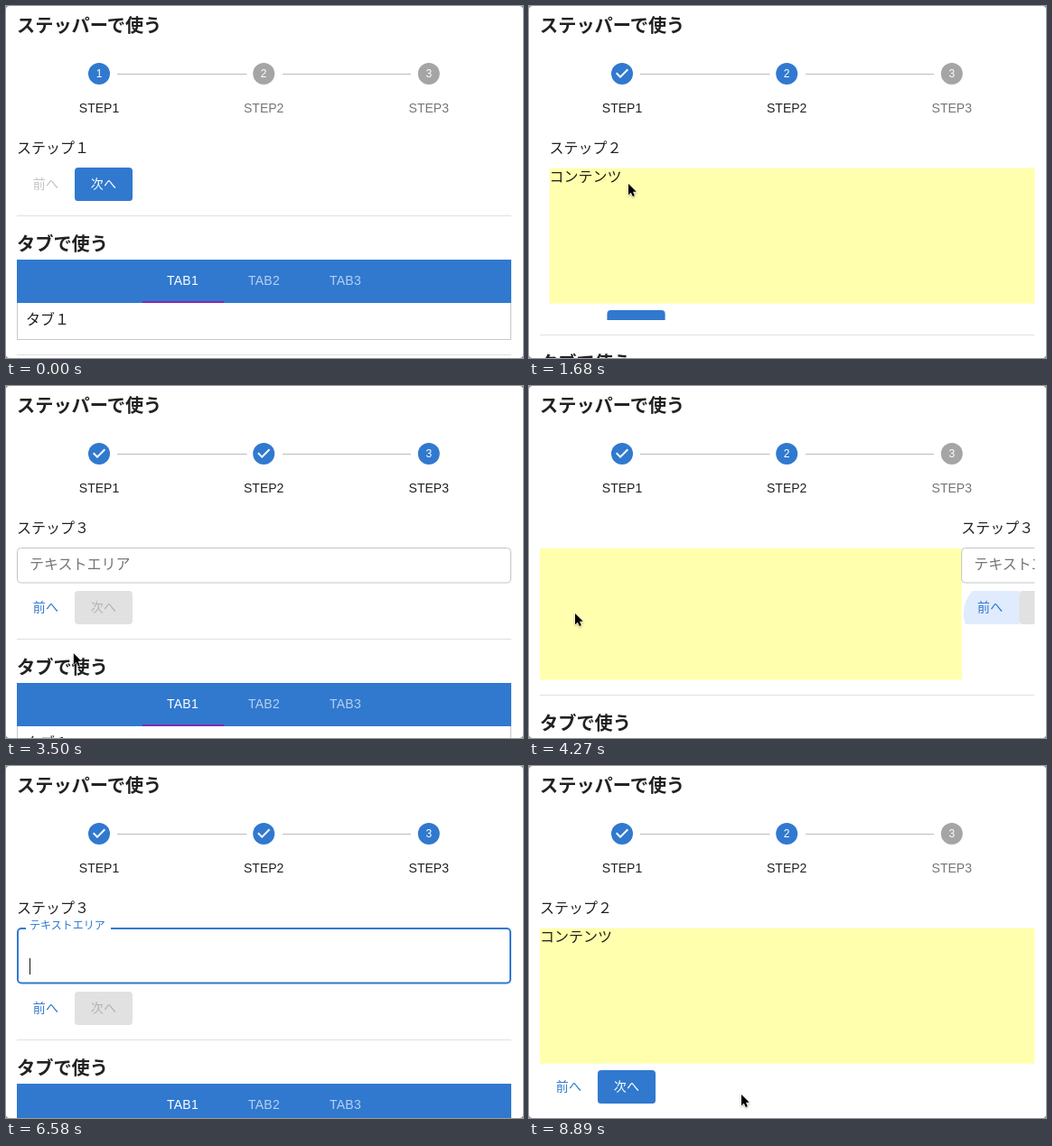
An HTML page that plays this animation: 572 px wide and 390 px high, repeating every 8.96 s.

```html
<!DOCTYPE html>
<html lang="ja">
<head>
<meta charset="utf-8">
<title>Stepper and tabs</title>
<style>
html, body { margin: 0; width: 100%; height: 100%; overflow: hidden; background: #fff; }
#stage { display: block; width: 572px; height: 390px; font-family: "Noto Sans CJK JP", "Noto Sans CJK", sans-serif; }
.latin { font-family: "Liberation Sans", Arial, sans-serif; }
</style>
</head>
<body>
<svg id="stage" viewBox="0 0 572 390"></svg>
<script>
const LOOP = 8960, PAGE = 547;
const BLUE = [48, 121, 207], DARK_BLUE = [38, 100, 184], GRAY = [165, 165, 165];
const INK = [33, 33, 33], MUTED = [117, 117, 117];
const stage = document.getElementById('stage');

// Page changes: swipe start, height change start, and the moment both settle
const moves = [
  { to: 1, swipe: 1402, grow: 1515, end: 1750 },
  { to: 2, swipe: 2752.5, grow: 2770, end: 3080 },
  { to: 1, swipe: 4097, grow: 4186, end: 4410 },
  { to: 2, swipe: 5171, grow: 5247, end: 5521 },
  { to: 1, swipe: 7910, grow: 7995, end: 8260 }
];
const presses = [
  { page: 0, next: true, x: 34, y: 18, enter: 700, down: 1260, up: 1400 },
  { page: 1, next: true, x: 23, y: 5, enter: 2380, down: 2600, up: 2750 },
  { page: 2, next: false, x: 39, y: 25, enter: 3620, down: 3990, up: 4095 },
  { page: 1, next: true, x: 24, y: 13, enter: 4820, down: 5030, up: 5169 },
  { page: 2, next: false, x: 37, y: 16, enter: 7540, down: 7770, up: 7910 }
];
const pointerPath = [
  [70, 566, 380], [840, 118, 205], [980, 118, 205], [1200, 110, 197],
  [2030, 110, 197], [2500, 99, 341], [3220, 99, 341], [3780, 51, 252],
  [4550, 51, 252], [4900, 100, 350], [5180, 104, 350], [5320, 127, 276],
  [5700, 126, 204], [7140, 126, 204], [7630, 49, 289], [8750, 49, 289], [8890, 235, 364]
];
const FOCUS = 6040, BLUR = 7780;

const clamp = v => Math.max(0, Math.min(1, v));
const lerp = (a, b, p) => a + (b - a) * p;
const mix = (a, b, p) => `rgb(${a.map((v, i) => Math.round(lerp(v, b[i], p)))})`;
const blueFill = mix(BLUE, BLUE, 0);

function bezier(x1, y1, x2, y2) {
  const at = (a, b, s) => 3 * (1 - s) ** 2 * s * a + 3 * (1 - s) * s * s * b + s ** 3;
  return p => {
    if (p <= 0) return 0;
    if (p >= 1) return 1;
    let low = 0, high = 1;
    for (let i = 0; i < 24; i++) {
      const mid = (low + high) / 2;
      if (at(x1, x2, mid) < p) low = mid; else high = mid;
    }
    return at(y1, y2, low);
  };
}
const swipeEase = bezier(.15, .3, .25, 1);
const standardEase = bezier(.4, 0, .2, 1);
const outEase = bezier(0, 0, .2, 1);

const rect = (x, y, w, h, fill, extra = '') =>
  `<rect x="${x}" y="${y}" width="${w}" height="${h}" fill="${fill}" ${extra}/>`;
const text = (x, y, size, fill, content, extra = '') =>
  `<text x="${x}" y="${y}" font-size="${size}" fill="${fill}" ${extra}>${content}</text>`;
const centered = (x, y, size, fill, content, extra = '') =>
  text(x, y, size, fill, content, `class="latin" text-anchor="middle" ${extra}`);
const heading = (y, content) => text(12, y, 20.2, '#212121', content, 'font-weight="700"');
const group = (x, y, content, extra = '') =>
  `<g transform="translate(${x} ${y})" ${extra}>${content}</g>`;

function layout(t) {
  const lines = t >= 6650 ? 2 : t >= 6580 ? 1 : 0;
  const bottoms = [216, 374, 264 + 23 * lines];
  let from = 0, step = 0, move = null;
  for (const m of moves) {
    if (t < m.swipe - 30) break;
    from = step;
    step = m.to;
    move = m;
  }
  if (!move) return { lines, from, step, page: 0, bottom: bottoms[0], fade: 1 };
  const progress = start => t >= move.end ? 1 : swipeEase((t - start) / 350);
  return {
    lines, from, step,
    page: lerp(from, step, progress(move.swipe)),
    bottom: lerp(bottoms[from], bottoms[step], progress(move.grow)),
    fade: standardEase((t - move.swipe + 30) / 200)
  };
}

function stepper({ from, step, fade }) {
  let out = rect(123, 75, 143.5, 1, '#bdbdbd') + rect(306, 75, 142, 1, '#bdbdbd');
  [103, 285.2, 467.8].forEach((x, i) => {
    const active = lerp(i <= from ? 1 : 0, i <= step ? 1 : 0, fade);
    const mark = i < step
      ? '<path d="M-2 5L-7 0l1.4-1.4L-2 2.2l7.6-7.6L7-4z" fill="#fff"/>'
      : centered(0, 4.2, 12, '#fff', i + 1);
    out += group(x, 75, `<circle r="12" fill="${mix(GRAY, BLUE, active)}"/>` + mark);
    out += centered(x, 118, 14, mix(MUTED, INK, active), 'STEP' + (i + 1));
  });
  return out;
}

function button(t, page, next, y, enabled) {
  let hover = 0, ripple = '';
  for (const p of presses) {
    if (p.page !== page || p.next !== next || t < p.enter) continue;
    hover = clamp((t - p.enter) / 250) * (1 - clamp((t - p.up) / 250));
    if (t >= p.down && t < p.up + 550) {
      const radius = 46 * standardEase((t - p.down) / 550);
      const opacity = .26 * (1 - standardEase((t - p.up) / 550));
      ripple = `<circle cx="${p.x}" cy="${p.y}" r="${radius}" fill="${next ? '#fff' : '#3d83f0'}" opacity="${opacity}"/>`;
    }
  }
  const x = next ? 76 : 12, blue = mix(BLUE, DARK_BLUE, hover);
  let face = '', ink = enabled ? blueFill : '#c3c3c3';
  if (next) {
    ink = enabled ? '#fff' : '#b3b3b3';
    if (enabled) face = rect(0, .8, 64, 37, '#000', 'rx="4" opacity=".2"');
    face += rect(0, 0, 64, 37, enabled ? blue : '#e1e1e1', 'rx="4"');
  } else if (hover) {
    face = rect(0, 0, 64, 37, blue, `rx="4" opacity="${.03 * hover}"`);
  }
  return group(x, y, face + `<svg width="64" height="37">${ripple}</svg>` +
    text(17.8, 23, 14, ink, next ? '次へ' : '前へ', 'letter-spacing=".2"'));
}

const buttons = (t, page, y) =>
  button(t, page, false, y, page > 0) + button(t, page, true, y, page < 2);

function textField(t, lines) {
  const focused = t >= FOCUS && t < BLUR;
  const shrink = outEase((t - FOCUS) / 200);
  const accent = focused ? blueFill : '#757575';
  const inset = focused ? 1 : .5;
  const height = 39.5 + 23 * lines;
  let out = rect(12 + inset, 179 + inset, PAGE - 2 * inset, height - 2 * inset, 'none',
    `rx="4" stroke="${focused ? accent : '#c4c4c4'}" stroke-width="${2 * inset}"`);
  if (shrink) out += rect(lerp(69, 22, shrink), 178, 94 * shrink, 4, '#fff');
  out += text(26, lerp(203.2, 181, shrink), lerp(16, 12, shrink), accent, 'テキストエリア');
  if (focused && (t < 7140 || t >= 7630)) out += rect(26, 213 + 23 * (lines - 1), 1, 18, '#111');
  return out;
}

function pages(t, { page, bottom, lines }) {
  const title = n => text(12, 163.3, 16, '#212121', 'ステップ' + n);
  const contents = [
    title('１') + buttons(t, 0, 179),
    title('２') + rect(12, 179.7, PAGE + .5, 150, '#ffffad') +
      text(12, 195.3, 16, '#212121', 'コンテンツ') + buttons(t, 1, 337),
    title('３') + textField(t, lines) + buttons(t, 2, 227 + 23 * lines)
  ];
  const slides = contents.map((c, i) =>
    Math.abs(i - page) < 1 ? group((i - page) * PAGE, 0, c) : '').join('');
  return `<clipPath id="view">${rect(12, 140, PAGE + .5, bottom - 140, '#000')}</clipPath>` +
    `<g clip-path="url(#view)">${slides}</g>`;
}

function tabs(bottom) {
  const labels = [1, 2, 3].map(n => centered(105.5 + 90 * n, 77, 14, '#fff', 'TAB' + n,
    `letter-spacing=".3" opacity="${n === 1 ? 1 : .65}"`)).join('');
  return group(0, Math.round(bottom + 16),
    rect(12, 0, PAGE, 1, '#e0e0e0') +
    heading(38.7, 'タブで使う') +
    rect(12.5, 96.5, PAGE - 1, 41, '#fff', 'stroke="#c8c8c8"') +
    rect(12, 49, PAGE, 48, blueFill) + labels +
    rect(151, 95, 90, 2, '#8527b0') +
    text(22, 121.3, 16, '#212121', 'タブ１') +
    rect(12, 154, PAGE, 1, '#e0e0e0'));
}

const arrow = '<path transform="scale(.86)" d="M0 0V14.3L3.3 11.2 5.6 16.4 8 15.4 5.8 10.3H10.2Z" fill="#000" stroke="#fff" stroke-width="1.3" paint-order="stroke"/>';
const hand = '<path d="M-1.5 1Q0-1 1.5 1V6Q3 5 4 6.5 5.5 5.5 6.5 7.2 8.5 6.5 9 9V12L7 17H-1L-5.5 10.5Q-6 8-3.5 9L-1.5 11Z" fill="#fff" stroke="#000" stroke-width="1.1" stroke-linejoin="round"/>';
const beam = '<path d="M-3-8Q0-8 0-6V6Q0 8-3 8M3-8Q0-8 0-6M0 6Q0 8 3 8" fill="none" stroke="#222" stroke-width="1.2"/>';

function pointer(t) {
  if (t < 70 || (t >= 6580 && t < 7140)) return '';
  let i = 0;
  while (i < pointerPath.length - 2 && t >= pointerPath[i + 1][0]) i++;
  const [t0, x0, y0] = pointerPath[i], [t1, x1, y1] = pointerPath[i + 1];
  const p = clamp((t - t0) / (t1 - t0)), eased = p * p * (3 - 2 * p);
  const overButton = presses.some(b => t >= b.enter && t < b.up);
  const overField = (t >= 5600 && t < 6580) || (t >= 7140 && t < 7320);
  return group(lerp(x0, x1, eased), lerp(y0, y1, eased),
    overButton ? hand : overField ? beam : arrow,
    'style="filter:drop-shadow(0 1px 1px rgba(0,0,0,.3))"');
}

function draw(t) {
  const state = layout(t);
  stage.innerHTML = rect(0, 0, 572, 390, '#858585') + rect(0, 0, 572, 390, '#fff', 'rx="4"') +
    heading(29, 'ステッパーで使う') +
    stepper(state) + pages(t, state) + tabs(state.bottom) + pointer(t);
}

const began = performance.now();
function tick() {
  draw((performance.now() - began) % LOOP);
  requestAnimationFrame(tick);
}
tick();
</script>
</body>
</html>
```
